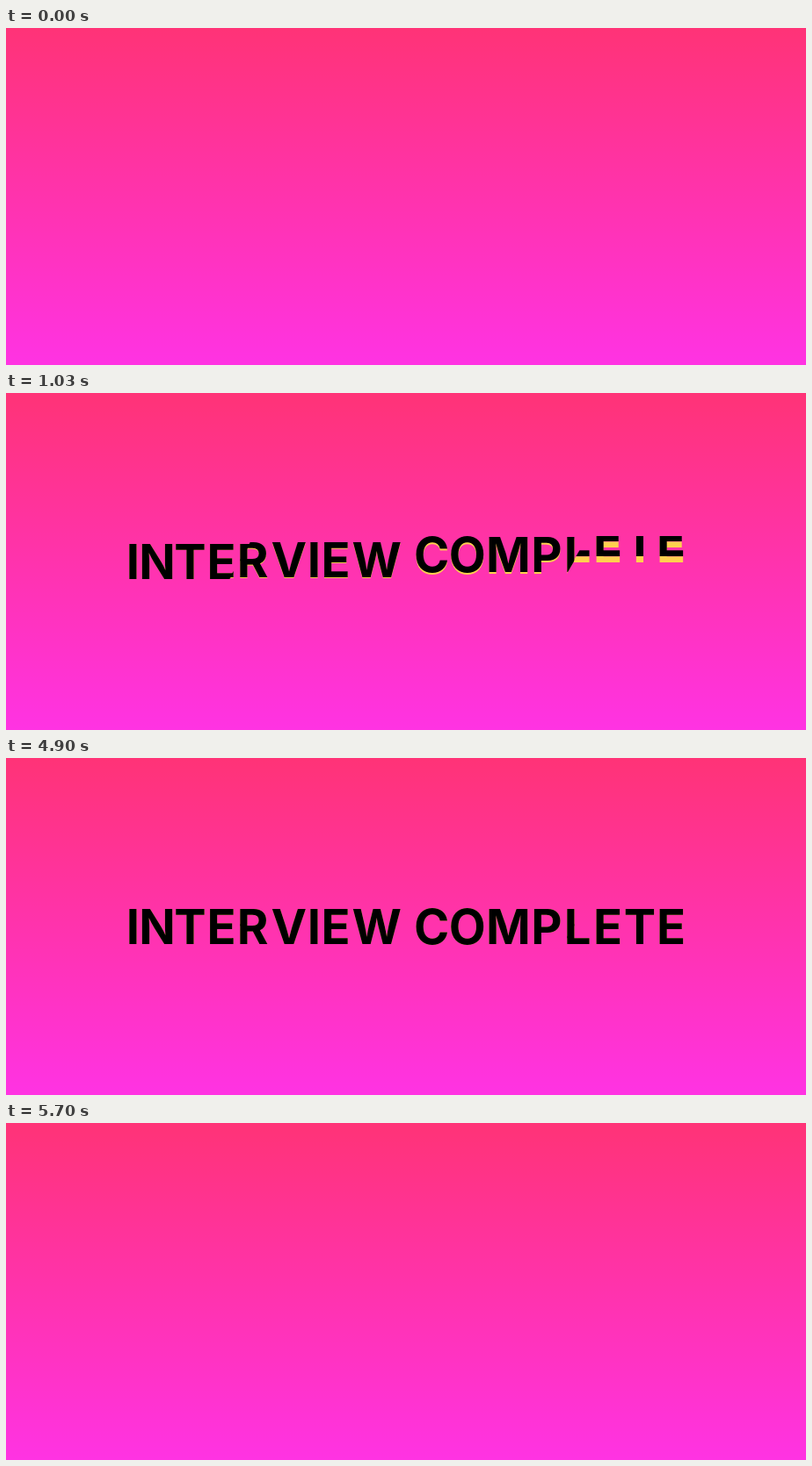
Animation of 910 by 384 pixels, one loop 6010 ms. Source, as an HTML page with a canvas:

```html
<!DOCTYPE html>
<html lang="en">
<head>
<meta charset="utf-8">
<title>Interview complete</title>
<style>
  html, body { margin: 0; width: 100%; height: 100%; overflow: hidden; }
  canvas { display: block; }
</style>
</head>
<body>
<canvas id="stage" width="910" height="384" role="img" aria-label="INTERVIEW COMPLETE"></canvas>
<script>
const ctx = document.getElementById('stage').getContext('2d');
const WIDTH = 910, HEIGHT = 384, LOOP = 6010;

// The line of text sits in a box that is cut into four slanted slices.
const TOP = 163, BOTTOM = 221, TRAVEL = BOTTOM - TOP;
const SLICES = 4, SLICE_WIDTH = 190, OVERLAP = 1;
const SLANT = Math.tan(Math.PI / 6);

const TEXT = 'INTERVIEWCOMPLETE';
const CENTERS = [
  144.5, 172, 209.5, 245.5, 282, 322, 350.5, 375.5, 421.5,
  484, 524.5, 571.5, 616, 651, 685, 721, 757
];
const BASELINE = 212, CAP_HEIGHT = 40;

const EXIT_START = 4800, EXIT_TIME = 700;

const background = ctx.createLinearGradient(0, 0, 0, HEIGHT);
background.addColorStop(0, '#ff3377');
background.addColorStop(1, '#ff33e3');

const font = size => `700 ${size}px Inter, "Liberation Sans", sans-serif`;

function layOutLetters() {
  ctx.font = font(1000);
  const size = CAP_HEIGHT * 1000 / ctx.measureText('E').actualBoundingBoxAscent;
  const letters = [...TEXT].map((char, i) => {
    const box = ctx.measureText(char);
    const middle = (box.actualBoundingBoxRight - box.actualBoundingBoxLeft) / 2;
    return { char, x: CENTERS[i] - middle * size / 1000 };
  });
  return { size, letters };
}
const { size, letters } = layOutLetters();

const clamp = x => Math.min(1, Math.max(0, x));

// Eases out along cubic-bezier(.19, 1, .22, 1); returns the part still to go.
function remaining(x) {
  let low = 0, high = 1;
  for (let i = 0; i < 30; i++) {
    const s = (low + high) / 2, r = 1 - s;
    const at = 0.57 * s * r * r + 0.66 * s * s * r + s * s * s;
    if (at < x) low = s; else high = s;
  }
  return (1 - low) ** 3;
}

const expoIn = x => x > 0 ? 2 ** (10 * (x - 1)) : 0;

// The yellow layer arrives a little before the black one and leaves after it.
function offset(t, slice, isEcho) {
  const exitStart = EXIT_START + 65 * slice + (isEcho ? 15 : 0);
  if (t >= exitStart) return TRAVEL * expoIn(clamp((t - exitStart) / EXIT_TIME));
  const duration = 1010 + 215 * slice;
  const start = 300 + 177 * slice - (isEcho ? 0.034 * duration : 0);
  return -TRAVEL * remaining(clamp((t - start) / duration));
}

function clipSlice(slice) {
  const left = WIDTH / 2 + (slice - SLICES / 2) * SLICE_WIDTH;
  const right = left + SLICE_WIDTH + OVERLAP;
  const lean = SLANT * TRAVEL / 2;
  ctx.beginPath();
  ctx.moveTo(left + lean, TOP);
  ctx.lineTo(right + lean, TOP);
  ctx.lineTo(right - lean, BOTTOM);
  ctx.lineTo(left - lean, BOTTOM);
  ctx.clip();
}

function drawLayer(t, color, isEcho) {
  ctx.fillStyle = color;
  for (let slice = 0; slice < SLICES; slice++) {
    const dy = offset(t, slice, isEcho);
    ctx.save();
    clipSlice(slice);
    for (const { char, x } of letters) ctx.fillText(char, x, BASELINE + dy);
    ctx.restore();
  }
}

function draw(t) {
  ctx.fillStyle = background;
  ctx.fillRect(0, 0, WIDTH, HEIGHT);
  ctx.font = font(size);
  drawLayer(t, '#ffd04f', true);
  drawLayer(t, '#000', false);
}

const begin = performance.now();
function tick() {
  draw((performance.now() - begin) % LOOP);
  requestAnimationFrame(tick);
}
tick();
</script>
</body>
</html>
```
